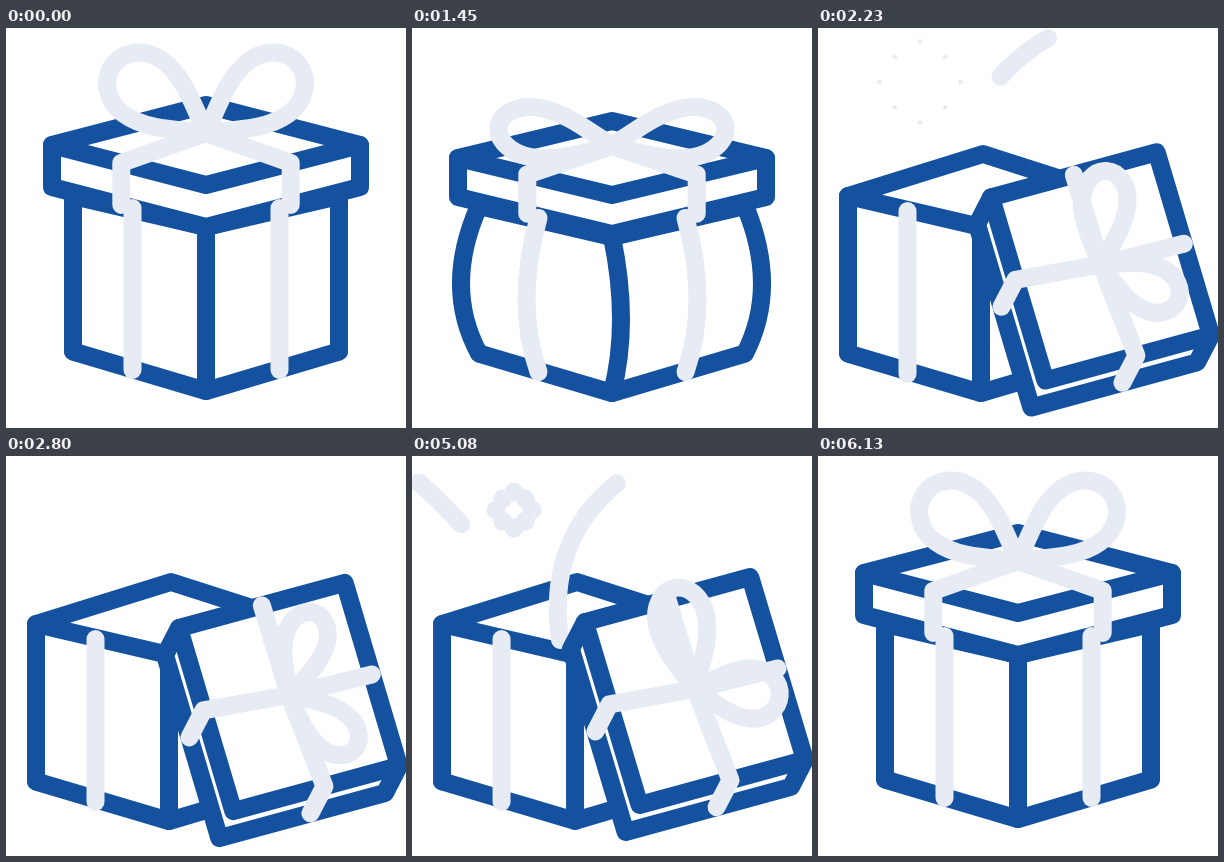
Write an HTML page with a canvas that moves like this. It is 400x400 px and loops after 6.16 s.

```html
<!DOCTYPE html>
<html lang="en">
<head>
<meta charset="utf-8">
<title>Gift box</title>
<style>
  html, body { margin: 0; width: 100%; height: 100%; overflow: hidden; background: #fff; }
  canvas { display: block; width: 100vw; height: 100vh; }
</style>
</head>
<body>
<canvas id="stage" width="400" height="400"></canvas>
<script>
const ctx = document.getElementById('stage').getContext('2d');
const BLUE = '#14519f', RIBBON = '#e6ebf4';
const LOOP = 6160, STEP = 30, STEPS = 60, OPEN_AT = 1000, CLOSE_AT = 4360;
const SQUASHED = 450, LAUNCH = 570, APEX = 720, LANDED = 1050, END = 1800;

const clamp = (x, low, high) => Math.max(low, Math.min(high, x));
const progress = (t, from, to) => clamp((t - from) / (to - from), 0, 1);
const smooth = (t, from, to) => {
  const u = progress(t, from, to);
  return u * u * (3 - 2 * u);
};
const easeOut = (t, from, to) => 1 - (1 - progress(t, from, to)) ** 3;

const lerp = (a, b, u) => a + (b - a) * u;
const mix = (a, b, u) => [lerp(a[0], b[0], u), lerp(a[1], b[1], u)];
const add = (a, b) => [a[0] + b[0], a[1] + b[1]];
const sub = (a, b) => [a[0] - b[0], a[1] - b[1]];
const polar = (length, degrees) => {
  const angle = degrees * Math.PI / 180;
  return [length * Math.cos(angle), length * Math.sin(angle)];
};

// The lid is pressed down, pushed off, then thrown along a parabola.
function lidHeight(t, settle) {
  if (t < LAUNCH) return 117 + 13 * smooth(t, 0, SQUASHED) - 18 * progress(t, SQUASHED, LAUNCH) ** 2;
  return Math.min(80 + .00143 * (t - APEX) ** 2, 235 + 6 * settle);
}

function poseAt(t) {
  const press = smooth(t, 0, SQUASHED);
  const turn = smooth(t, 590, 1060);
  const settle = easeOut(t, LANDED, END);
  const bulge = press * (1 - smooth(t, SQUASHED, 620));

  const center = [200 + 83 * turn, lidHeight(t, settle)];
  const side = mix([154, 0], [110, 69], turn);
  const depth = polar(lerp(40 - 3 * bulge, 127, turn ** 2.5), 90 + 26 * turn ** 3);
  const lid = {
    left: sub(center, side), right: add(center, side),
    front: add(center, depth), back: sub(center, depth),
    rim: mix([0, 42 - 3 * bulge], [-14, 27], turn)
  };

  const spread = 36 - 26 * press + 39 * smooth(t, LAUNCH, 930) - 15 * smooth(t, 930, 1100);
  const swing = 42 * turn ** 4 + 31 * settle;
  const bow = {
    knot: add(center, [0, -12 + 10 * turn]),
    leftTip: polar(115 - 12 * turn - 17 * settle, 180 + spread + swing),
    rightTip: polar(115 - 30 * turn, swing - spread),
    width: 33 - 8 * press - 4 * settle
  };

  const lift = clamp(center[1] - 117, -5, 10) * (1 - smooth(t, 600, 700));
  return { lid, bow, box: { turn, bulge, lift }, backRibbon: smooth(t, 930, LANDED) };
}

function line(color, points, closed) {
  ctx.beginPath();
  points.forEach(p => ctx.lineTo(...p));
  if (closed) ctx.closePath();
  ctx.strokeStyle = color;
  ctx.stroke();
}

// Vertical edge that bows sideways by the given amount.
function bowed(color, top, foot, amount) {
  const control = add(mix(top, foot, .55), [2 * amount, 0]);
  ctx.beginPath();
  ctx.moveTo(...top);
  ctx.quadraticCurveTo(...control, ...foot);
  ctx.strokeStyle = color;
  ctx.stroke();
}

function drawBox({ turn, bulge, lift }) {
  const shift = -37 * turn, drop = 2 * (turn + bulge);
  const top = (x, y) => [x + shift, y + lift];
  const foot = (x, y) => [x + shift, y + drop];
  const left = top(67, 168), right = top(333, 168), front = top(200, 199);
  const leftFoot = foot(67, 323.5), rightFoot = foot(333, 323.5), frontFoot = foot(200, 363);
  line(BLUE, [left, [202 + shift, 126], right, front], true);
  line(BLUE, [leftFoot, frontFoot, rightFoot]);
  bowed(BLUE, left, leftFoot, -18 * bulge);
  bowed(BLUE, right, rightFoot, 17 * bulge);
  bowed(BLUE, front, frontFoot, 9 * bulge ** 2);
}

function drawBoxRibbons({ turn, bulge, lift }) {
  for (const side of [-1, 1]) {
    const x = 200 + 73.5 * side - 37 * turn;
    bowed(RIBBON, [x, 180 + lift + 3 * turn], [x, 342 + 4 * turn + 2 * bulge], 12 * side * bulge ** 2);
  }
}

function drawStreak(tail, head, a, b, c) {
  if (head <= tail) return;
  const point = u => mix(mix(a, b, u), mix(b, c, u), u);
  line(RIBBON, Array.from({ length: 25 }, (_, i) => point(lerp(tail, head, i / 24))));
}

function drawBurst(t) {
  const radius = 9.5 * smooth(t, 850, 910) * (1 - smooth(t, 1080, 1300));
  const distance = Math.max(0, t - 906) / 8;
  ctx.fillStyle = RIBBON;
  for (let i = 0; i < 8; i++) {
    const [x, y] = polar(distance * (i % 2 ? .88 : 1), i * 45);
    ctx.beginPath();
    ctx.arc(102 + x, 54 + y, radius, 0, 7);
    ctx.fill();
  }
}

function drawConfetti(t) {
  drawStreak(smooth(t, 860, 1160), easeOut(t, 740, 1160), [120, 175], [85, 95], [4, 24]);
  drawStreak(smooth(t, 1050, 1330), easeOut(t, 920, 1190), [148, 184], [132, 68], [230, 10]);
  drawBurst(t);
}

function drawLid({ left, right, front, back, rim }) {
  const under = [left, front, right].map(p => add(p, rim));
  ctx.beginPath();
  [left, back, right, ...under.reverse()].forEach(p => ctx.lineTo(...p));
  ctx.fillStyle = '#fff';
  ctx.fill();
  line(BLUE, [left, back, right, front], true);
  line(BLUE, [right, ...under, left]);
}

function drawLidRibbons({ left, right, front, back, rim }, knot, backRibbon) {
  for (const corner of [left, right]) {
    const edge = mix(corner, front, .45);
    line(RIBBON, [knot, edge, add(edge, rim)]);
    line(RIBBON, [knot, mix(knot, mix(corner, back, .5), backRibbon)]);
  }
}

// Teardrop from the knot to the tip, with a round end.
function drawLoop(knot, [x, y], width) {
  const length = Math.hypot(x, y);
  const at = (along, across) => add(knot, [
    x * along - y / length * across * width,
    y * along + x / length * across * width
  ]);
  ctx.beginPath();
  for (const side of [-1, 1]) {
    ctx.moveTo(...knot);
    ctx.bezierCurveTo(...at(.25, .5 * side), ...at(.45, side), ...at(.68, side));
    ctx.bezierCurveTo(...at(.86, side), ...at(1, .55 * side), ...at(1, 0));
  }
  ctx.strokeStyle = RIBBON;
  ctx.stroke();
}

function draw(t) {
  const { lid, bow, box, backRibbon } = poseAt(t);
  const closed = t < 630;
  ctx.clearRect(0, 0, 400, 400);
  ctx.lineWidth = 18;
  ctx.lineCap = ctx.lineJoin = 'round';
  drawBox(box);
  if (!closed) drawBoxRibbons(box);
  drawConfetti(t);
  drawLid(lid);
  if (closed) drawBoxRibbons(box);
  drawLidRibbons(lid, bow.knot, backRibbon);
  drawLoop(bow.knot, bow.leftTip, bow.width);
  drawLoop(bow.knot, bow.rightTip, bow.width);
}

// The box opens in steps, rests, then runs the same steps backwards.
function phase(t) {
  const step = t < CLOSE_AT
    ? Math.floor((t - OPEN_AT) / STEP)
    : STEPS - 1 - Math.floor((t - CLOSE_AT) / STEP);
  return STEP * clamp(step, 0, STEPS);
}

function tick() {
  draw(phase(performance.now() % LOOP));
  requestAnimationFrame(tick);
}
tick();
</script>
</body>
</html>
```
